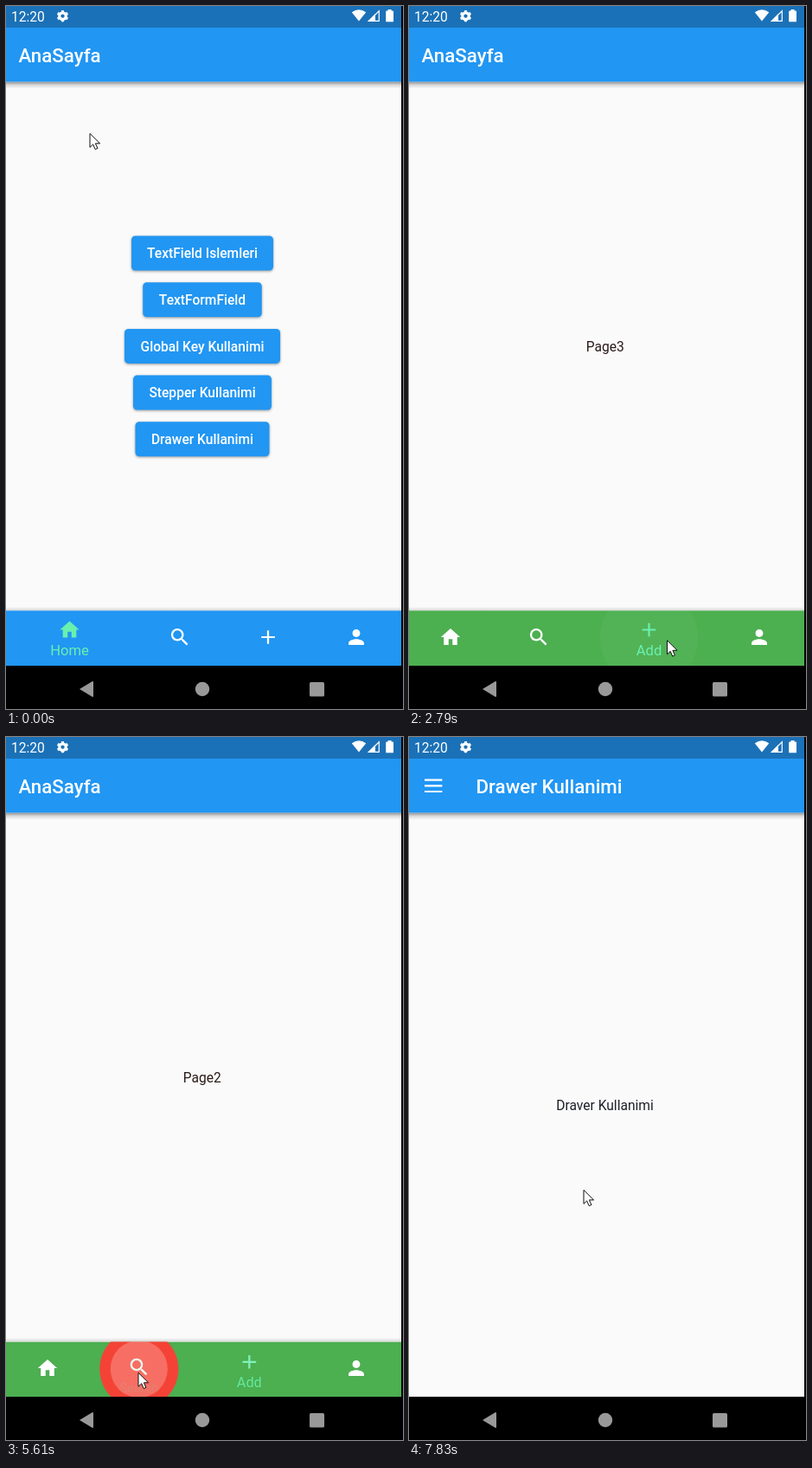
An HTML page that plays this animation: 459 by 812 pixels, repeating every 8000 ms.

```html
<!DOCTYPE html>
<html lang="tr">
<head>
<meta charset="utf-8">
<title>AnaSayfa</title>
<style>
  html, body { margin: 0; width: 100%; height: 100%; overflow: hidden; background: #000; }
  svg { display: block; width: 100%; height: 100%; }
  text { font-family: Roboto, sans-serif; font-size: 15.6px; }
  .title { font-size: 22.3px; font-weight: 500; fill: #fff; }
  .button rect { fill: #2196f3; filter: drop-shadow(0 1.6px 1.4px rgba(0, 0, 0, .38)); }
  .button text { font-weight: 500; fill: #fff; }
  .mid { text-anchor: middle; }
</style>
</head>
<body>
<svg id="stage" viewBox="0 0 459 812">
  <defs>
    <linearGradient id="below" x2="0" y2="1">
      <stop offset="0" stop-opacity=".42"/><stop offset=".45" stop-opacity=".14"/><stop offset="1" stop-opacity="0"/>
    </linearGradient>
    <linearGradient id="above" x2="0" y2="1">
      <stop offset="0" stop-opacity="0"/><stop offset="1" stop-opacity=".14"/>
    </linearGradient>
    <clipPath id="screen"><rect width="457" height="762"/></clipPath>
    <clipPath id="barClip"><rect y="698.5" width="457" height="63.5"/></clipPath>
    <g id="shell">
      <rect width="457" height="762" fill="#fafafa"/>
      <rect y="87.5" width="457" height="8" fill="url(#below)"/>
      <rect y="24" width="457" height="63.5" fill="#2196f3"/>
      <rect width="457" height="25" fill="#1b71b7"/>
    </g>
  </defs>
  <rect width="459" height="812"/>

  <g clip-path="url(#screen)">
    <use href="#shell"/>
    <text class="title" x="14.5" y="64.7">AnaSayfa</text>
    <g id="buttons"></g>
    <text id="page" class="mid" x="226.8" y="398.6" fill="#2a1a17"></text>
    <rect y="694" width="457" height="4.5" fill="url(#above)"/>
    <g clip-path="url(#barClip)">
      <rect id="bar" y="698.5" width="457" height="63.5"/>
      <circle id="reveal" cy="730"/>
      <circle id="splash" cy="730" fill="#fff"/>
      <g id="items"></g>
    </g>
    <g id="drawer">
      <use href="#shell"/>
      <path d="M18 49.6h20.4M18 56.3h20.4M18 63h20.4" stroke="#fff" stroke-width="2.2"/>
      <text class="title" x="77.5" y="64.7">Drawer Kullanimi</text>
      <text class="mid" x="226.5" y="430.5" fill="#1c2026">Draver Kullanimi</text>
    </g>
  </g>

  <g fill="#fff">
    <text x="6" y="17.6">12:20</text>
    <g fill="none" stroke="#fff">
      <circle cx="65.5" cy="11.6" r="3.8" stroke-width="3.2"/>
      <circle cx="65.5" cy="11.6" r="5.7" stroke-width="2" pathLength="12" stroke-dasharray="1" stroke-dashoffset="-.5"/>
    </g>
    <path d="M408 17.6L399.8 7.2Q408 1.2 416.200 7.200Z"/>
    <path d="M418 18L427 9V18Z"/>
    <path d="M419.500 17.400L431.300 5.800V17.400Z" fill="none" stroke="#fff" stroke-width="1.200"/>
    <path d="M441.600 4h4v1.500h1.500q.9 0 .9.9v11q0 .9-.9.9h-7q-.9 0-.9-.9v-11q0-.9.9-.9h1.500z"/>
  </g>
  <g fill="#999">
    <path d="M85 789L99.500 780.300Q101 779.600 101 781V797Q101 798.400 99.500 797.700Z"/>
    <circle cx="227" cy="789" r="8.200"/>
    <rect x="351" y="781" width="17" height="16.500" rx="1.500"/>
  </g>
  <circle id="press" r="12" fill="#ffeb28" fill-opacity=".6"/>
  <path id="cursor" d="M0 .3V16.300L3.700 12.800 6.200 18.600 8.900 17.400 6.400 11.800H11.600Z" fill="#fff" stroke="#111" stroke-linejoin="round"/>
</svg>

<script>
const $ = id => document.getElementById(id);
const lerp = (a, b, p) => a + (b - a) * p;
const clamp = v => Math.max(0, Math.min(1, v));

function make(tag, parent, attrs, text) {
  const el = document.createElementNS($('stage').namespaceURI, tag);
  set(el, attrs);
  if (text) el.textContent = text;
  return parent.appendChild(el);
}
function set(el, attrs) {
  for (const k in attrs) el.setAttribute(k, attrs[k]);
}

// Cubic bezier easing, solved for x by bisection
function bezier(x1, y1, x2, y2) {
  const at = (a, b, s) => 3 * (1 - s) * (1 - s) * s * a + 3 * (1 - s) * s * s * b + s * s * s;
  return x => {
    if (x <= 0 || x >= 1) return clamp(x);
    let lo = 0, hi = 1;
    for (let i = 0; i < 24; i++) {
      const m = (lo + hi) / 2;
      if (at(x1, x2, m) < x) lo = m; else hi = m;
    }
    return at(y1, y2, lo);
  };
}
const fastOutSlowIn = bezier(.4, 0, .2, 1);
const easeIn = bezier(.42, 0, 1, 1);

const PERSON = 'M12 12c2.21 0 4-1.79 4-4s-1.79-4-4-4-4 1.79-4 4 1.79 4 4 4zm0 2c-2.67 0-8 1.34-8 4v2h16v-2c0-2.66-5.33-4-8-4z';
const PENCIL = 'M3 17.25V21h3.75L17.81 9.94l-3.75-3.75zM20.71 7.04c.39-.39.39-1.02 0-1.41l-2.34-2.34c-.39-.39-1.02-.39-1.41 0l-1.83 1.83 3.75 3.75z';
const tabs = [
  { label: 'Home', color: '#2196f3', icon: 'M10 20v-6h4v6h5v-8h3L12 3 2 12h3v8z' },
  { label: 'Search', color: '#f44336', icon: 'M15.5 14h-.79l-.28-.27a6.5 6.5 0 1 0-.7.7l.27.28v.79l5 4.99L20.49 19zm-6 0a4.5 4.5 0 1 1 0-9 4.5 4.5 0 0 1 0 9z' },
  { label: 'Add', color: '#4caf50', icon: 'M19 13h-6v6h-2v-6H5v-2h6V5h2v6h6z' },
  { label: 'Profile', color: '#3f51b5', icon: PERSON, active: PENCIL }
];
for (const tab of tabs) {
  tab.path = make('path', $('items'), {});
  tab.text = make('text', $('items'), { class: 'mid', fill: '#69f0ae' }, tab.label);
}

[['TextField Islemleri', 164], ['TextFormField', 137.5], ['Global Key Kullanimi', 180],
 ['Stepper Kullanimi', 160], ['Drawer Kullanimi', 155]].forEach(([label, w], i) => {
  const g = make('g', $('buttons'), { class: 'button', transform: `translate(227 ${265.5 + 53.7 * i})` });
  make('rect', g, { x: -w / 2, width: w, height: 40, rx: 4.5 });
  make('text', g, { class: 'mid', y: 25.7 }, label);
});

// [time, tab]
const taps = [[-999, 0], [1530, 1], [2560, 2], [3776, 3], [4957, 2], [5570, 1], [6370, 0]];
const DRAWER_TAP = 7525, PRESS_TICK = 28;

// [tick, x, y] of the pointer
const route = [
  [-1, 97, 147], [0, 115, 235], [1, 180, 520], [2, 225, 762], [3, 203, 733], [5, 203, 733],
  [6, 218, 738], [7, 268, 742], [8, 297, 731], [12, 299, 733], [13, 304, 737], [14, 328, 748],
  [15, 364, 753], [16, 406, 729], [18, 405, 731], [19, 385, 745], [20, 325, 770], [21, 262, 755],
  [22, 247, 743], [23, 246, 743], [24, 190, 757], [25, 153, 734], [26, 150, 735], [27, 95, 738],
  [28, 56, 724], [29, 57, 724], [30, 90, 700], [31, 190, 600], [32, 244, 532], [33, 222, 515],
  [34, 205, 508], [35, 203, 512], [36, 202, 523]
];
function pointer(tick) {
  const i = Math.max(1, route.findIndex(k => k[0] >= tick));
  const [a, b] = [route[i - 1], route[i]];
  const p = (tick - a[0]) / (b[0] - a[0]);
  return [lerp(a[1], b[1], p), lerp(a[2], b[2], p)];
}

function drawBar(t) {
  const n = taps.filter(k => k[0] <= t).length - 1;
  const [start, cur] = taps[n];
  const prev = n ? taps[n - 1][1] : cur;
  const age = t - start, p = fastOutSlowIn(age / 200);

  $('buttons').style.display = cur ? 'none' : '';
  $('page').textContent = cur ? 'Page' + (cur + 1) : '';

  let left = -3;
  tabs.forEach((tab, i) => {
    const on = i === cur ? p : i === prev ? 1 - p : 0;
    const w = 102 * (1 + on / 2), x = left + w / 2;
    left += w;
    tab.x = x;
    const rgb = [lerp(255, 105, on), lerp(255, 240, on), lerp(255, 174, on)].map(Math.round);
    set(tab.path, {
      d: i === cur && tab.active || tab.icon,
      fill: `rgb(${rgb})`,
      transform: `translate(${x} ${lerp(729, 720.5, on)}) scale(1.117) translate(-12 -12)`
    });
    set(tab.text, { x, y: lerp(758.2, 749.8, on), opacity: on, 'font-size': 0 });
    tab.text.style.fontSize = lerp(14.2, 16.6, on) + 'px';
  });

  const cx = tabs[cur].x;
  set($('bar'), { fill: tabs[p < 1 ? prev : cur].color });
  set($('reveal'), { cx, r: p * Math.hypot(Math.max(cx, 457 - cx), 32), fill: tabs[cur].color });
  set($('splash'), { cx, r: Math.min(57, 3 + .72 * age), opacity: .27 * clamp(1 - age / 260) });
}

function drawDrawer(t) {
  const p = clamp((t - DRAWER_TAP) / 300);
  set($('drawer'), {
    opacity: easeIn(p),
    transform: `translate(0 ${203 * (1 - fastOutSlowIn(p))})`
  });
}

function render(ms) {
  const tick = Math.max(-1, Math.floor((ms - 561) / 201.6));
  const t = tick < 0 ? 0 : 570 + tick * 201.67;
  drawBar(t);
  drawDrawer(t);
  const at = `translate(${pointer(tick)})`;
  set($('cursor'), { transform: at });
  set($('press'), { transform: at, opacity: +(tick === PRESS_TICK) });
}

const begin = performance.now();
function frame() {
  render((performance.now() - begin) % 8000);
  requestAnimationFrame(frame);
}
frame();
</script>
</body>
</html>
```
